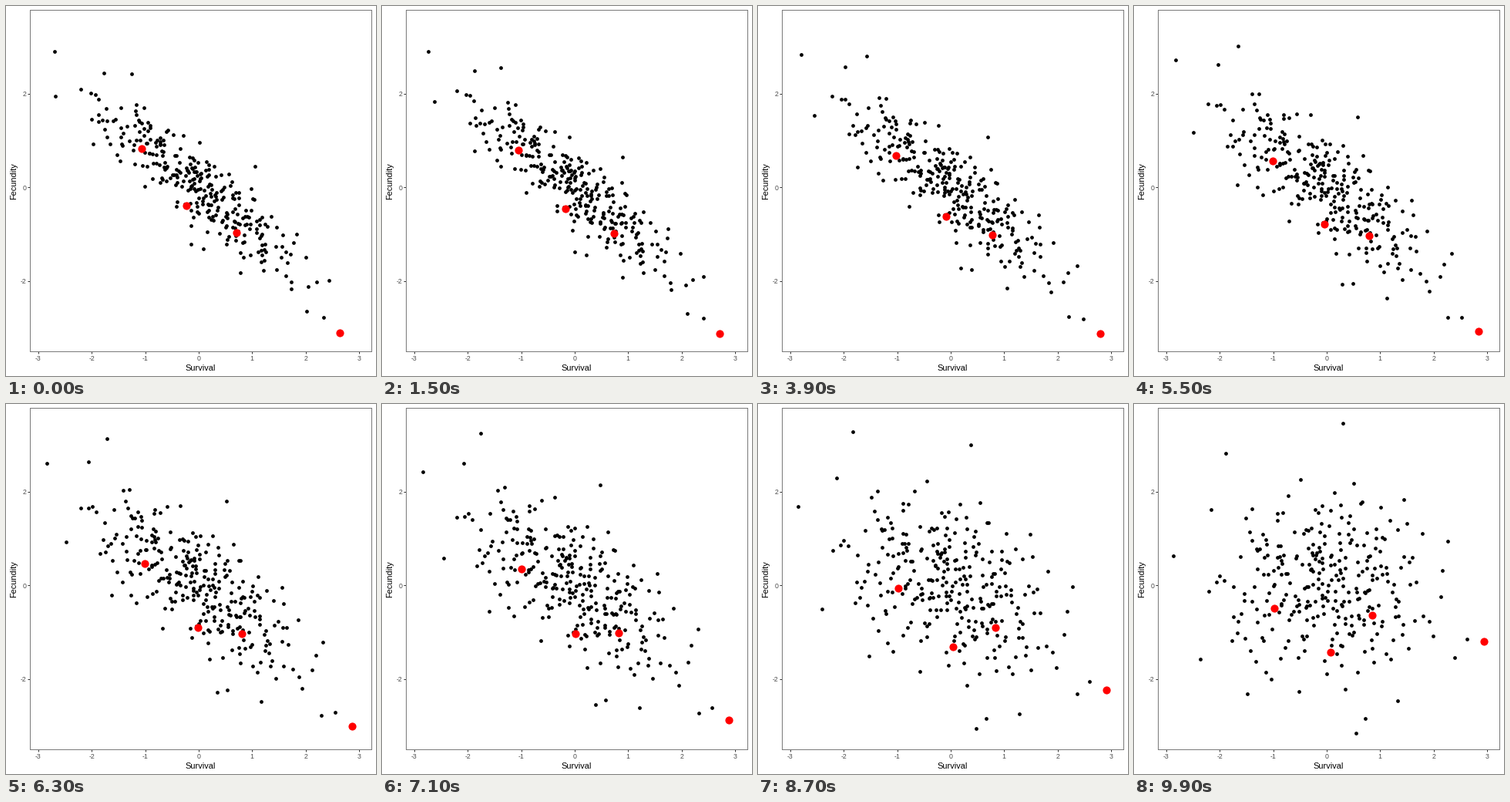
These frames come from a looping animation (480 by 480 pixels, 10 s). A matplotlib script:

```python
import numpy as np
import matplotlib.pyplot as plt
from matplotlib.animation import FuncAnimation

SIZE, DPI = 480, 100
PX = 72 / DPI              # one pixel in points
FRAMES, INTERVAL = 100, 100
LEFT, RIGHT, TOP, BOTTOM = 31, 474, 5, 448
X0, XU, Y0, YU = 249.9, 69.35, 235.4, 60.87   # origin and unit, in pixels
RATIO = 4.504              # long to short axis of the cloud
CORR = -0.053              # sample correlation of the unrotated cloud
N = 300

MARKED = np.array([(-.973, -.487), (.08, -1.42), (.85, -.628), (2.943, -1.20)])
EXTREMES = np.array([
    (-2.87, .63), (-1.89, 2.82), (-2.16, 1.62), (-2.37, -1.57),
    (-1.48, -2.31), (.55, -3.15), (.72, -2.83), (1.33, -2.46),
    (2.39, -1.54), (2.62, -1.14), (2.26, .94), (.30, 3.45),
])


def normal_cloud(n, radius=2.35, seed=11):
    """Normal cloud cut off at a radius, spread evenly from core to rim."""
    rng = np.random.default_rng(seed)
    i = np.arange(n)
    share = (1 - np.exp(-radius ** 2 / 2)) * (i + rng.random(n)) / n
    r = np.sqrt(-2 * np.log(1 - share))
    a = i * np.pi * (3 - np.sqrt(5)) + rng.normal(0, 0.5, n)
    return np.column_stack([r * np.cos(a), r * np.sin(a)])


def rotate(points, angle):
    """Turn the elongated cloud, then rescale both traits to unit variance."""
    a, b = points.T
    k, e = RATIO * np.tan(angle), np.tan(angle) / RATIO
    x = (a + e * b) / np.sqrt(1 + e * e + 2 * e * CORR)
    y = (b - k * a) / np.sqrt(1 + k * k - 2 * k * CORR)
    return x, y


def label(x, y, text, size, color, **kw):
    fig.text(x / SIZE, 1 - y / SIZE, text, fontsize=size * PX, color=color,
             va="baseline", rotation_mode="anchor", **kw)


plt.rcParams["font.family"] = "Liberation Sans"
fig = plt.figure(figsize=(SIZE / DPI, SIZE / DPI), dpi=DPI, facecolor="white")
ax = fig.add_axes([LEFT / SIZE, 1 - BOTTOM / SIZE,
                   (RIGHT - LEFT) / SIZE, (BOTTOM - TOP) / SIZE])
ax.set_xlim((LEFT - X0) / XU, (RIGHT - X0) / XU)
ax.set_ylim((Y0 - BOTTOM) / YU, (Y0 - TOP) / YU)
ax.set_xticks(range(-3, 4))
ax.set_yticks([-2, 0, 2])
ax.tick_params(length=3 * PX, width=PX, color="#333333",
               labelbottom=False, labelleft=False)
for spine in ax.spines.values():
    spine.set(linewidth=PX, color="#7a7a7a")

for v in range(-3, 4):
    label(X0 + v * XU, 460, str(v), 8.8, "#4d4d4d", ha="center")
for v in (-2, 0, 2):
    label(26.2, Y0 - v * YU + 3.2, str(v), 8.8, "#4d4d4d", ha="right")
label(252.5, 473, "Survival", 11, "black", ha="center")
label(13, 227, "Fecundity", 11, "black", ha="center", rotation=90)

cloud = np.vstack([EXTREMES, normal_cloud(N - len(EXTREMES) - len(MARKED))])
style = dict(marker="o", ls="none", mew=0)
dots, = ax.plot([], [], color="black", ms=4.8 * PX, **style)
reds, = ax.plot([], [], color="red", ms=10.2 * PX, zorder=3, **style)


def update(i):
    angle = np.pi / 4 * (1 - i / (FRAMES - 1))
    dots.set_data(*rotate(cloud, angle))
    reds.set_data(*rotate(MARKED, angle))
    return dots, reds


anim = FuncAnimation(fig, update, frames=FRAMES, interval=INTERVAL,
                     repeat=True, repeat_delay=0)
plt.show()
```
